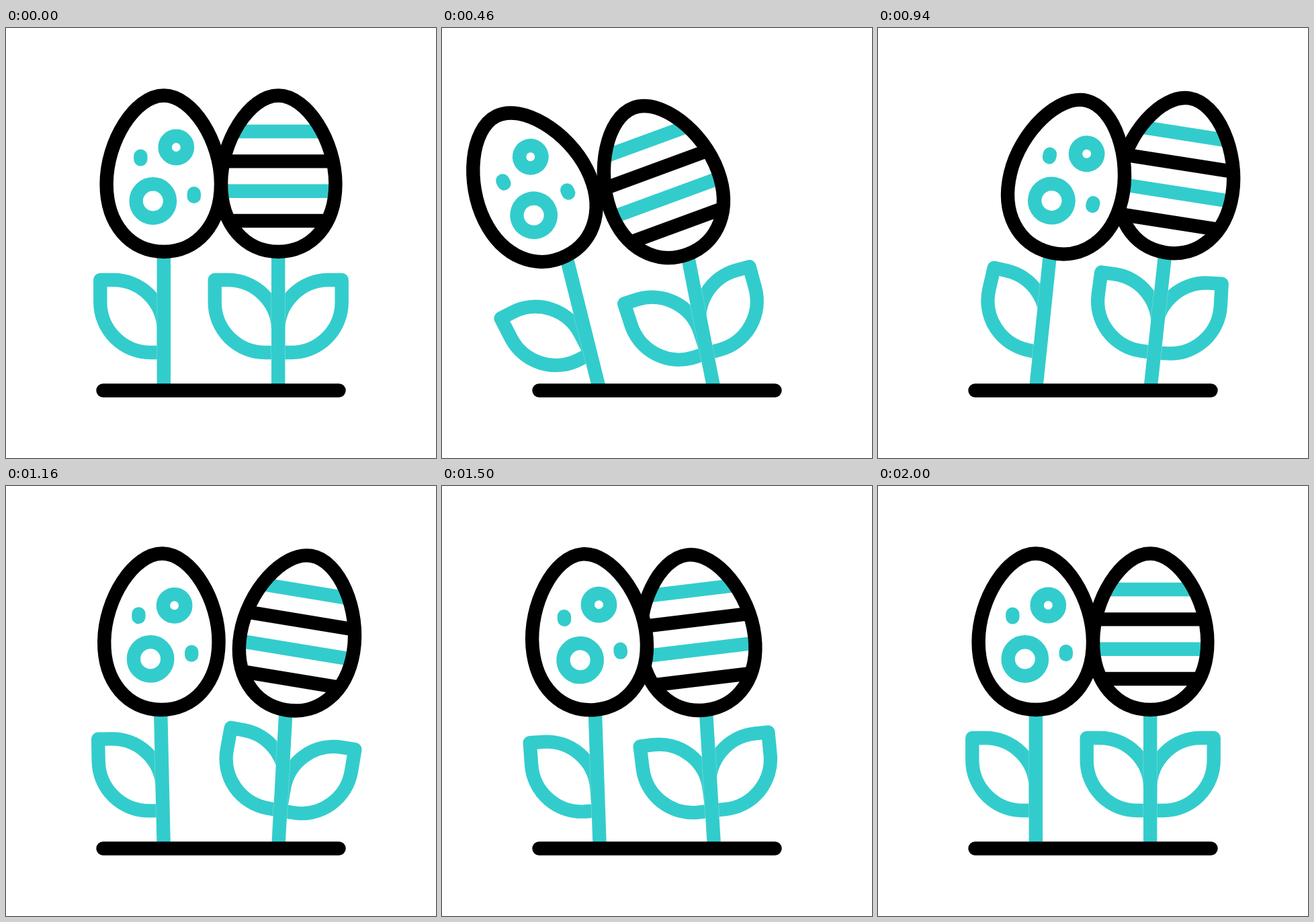
Recreate the animation shown at these times as an HTML page with a canvas. Size 640 by 640 pixels, loop 2.4 s.

```html
<!DOCTYPE html>
<html lang="en">
<head>
<meta charset="utf-8">
<title>Egg flowers</title>
<style>
html, body { margin: 0; width: 100%; height: 100%; overflow: hidden; background: #fff; }
canvas { display: block; width: 640px; height: 640px; }
</style>
</head>
<body>
<canvas id="stage"></canvas>
<script>
const LOOP = 2400, STEP = 20;
const TEAL = '#33cccc', BLACK = '#000', WHITE = '#fff';
const LINE = 20.4, GROUND = 539.5, EGG_BASE = 333, LEAF_BASE = 483;

const canvas = document.getElementById('stage');
const ratio = window.devicePixelRatio || 1;
canvas.width = canvas.height = 640 * ratio;
const ctx = canvas.getContext('2d');

// Swings as [time, degrees] keys, eased with a half cosine between them.
const spotted = {
  x: 234.8, delay: 0, pattern: spots,
  stem: [[0, 0], [480, -14.1], [880, 6.5], [1300, -3.9], [1700, 0]],
  egg: [[20, 0], [520, -27.5], [922, 13.6], [1335, -7.2], [1745, 0]],
  leaves: [
    { side: -1, keys: [[10, 0], [500, -27.8], [900, 13.4], [1315, -7.4], [1720, 0]] }
  ]
};
const striped = {
  x: 405.2, delay: 110, pattern: stripes,
  stem: [[0, 0], [480, -13.4], [880, 7], [1300, -3.9], [1700, 0]],
  egg: [[20, 0], [520, -27.2], [922, 14], [1335, -7.2], [1745, 0]],
  leaves: [
    { side: -1, keys: [[45, 0], [535, -26], [935, 14.2], [1350, -7.3], [1755, 0]] },
    { side: 1, keys: [[68, 0], [558, -24.3], [958, 11.5], [1373, -5.6], [1778, 0]] }
  ]
};

function swing(keys, t) {
  if (t <= keys[0][0]) return 0;
  for (let i = 1; i < keys.length; i++) {
    const [t0, a] = keys[i - 1], [t1, b] = keys[i];
    if (t < t1) return a + (b - a) * (1 - Math.cos(Math.PI * (t - t0) / (t1 - t0))) / 2;
  }
  return 0;
}

// Turns what is drawn about (0, y) by the given degrees.
function turned(y, deg, draw) {
  ctx.save();
  ctx.translate(0, y);
  ctx.rotate(deg * Math.PI / 180);
  ctx.translate(0, -y);
  draw();
  ctx.restore();
}

function line(x0, y0, x1, y1, color, cap = 'butt', width = LINE) {
  ctx.beginPath();
  ctx.moveTo(x0, y0);
  ctx.lineTo(x1, y1);
  ctx.lineCap = cap;
  ctx.lineWidth = width;
  ctx.strokeStyle = color;
  ctx.stroke();
}

function ring(x, y, r) {
  ctx.beginPath();
  ctx.arc(x, y, r, 0, Math.PI * 2);
  ctx.lineWidth = LINE;
  ctx.strokeStyle = TEAL;
  ctx.stroke();
}

function eggPath() {
  ctx.beginPath();
  ctx.moveTo(0, 100.5);
  ctx.bezierCurveTo(43, 100.5, 85.2, 169, 85.2, 232);
  ctx.bezierCurveTo(85.2, 293, 49, 333, 0, 333);
  ctx.bezierCurveTo(-49, 333, -85.2, 293, -85.2, 232);
  ctx.bezierCurveTo(-85.2, 169, -43, 100.5, 0, 100.5);
  ctx.closePath();
}

function egg(pattern) {
  eggPath();
  ctx.fillStyle = WHITE;
  ctx.fill();
  ctx.save();
  ctx.clip();
  pattern();
  ctx.restore();
  eggPath();
  ctx.lineWidth = LINE;
  ctx.strokeStyle = BLACK;
  ctx.stroke();
}

function spots() {
  ring(18.5, 177.5, 16.7);
  ring(-16, 257.5, 25.2);
  line(-34.5, 190.8, -34.5, 195.4, TEAL, 'round');
  line(45, 246.3, 45, 250.9, TEAL, 'round');
}

function stripes() {
  [154, 198.4, 242.7, 287].forEach((y, i) => line(-90, y, 90, y, i % 2 ? BLACK : TEAL));
}

function leaf(side, deg) {
  ctx.save();
  // keep the leaf on its own side of the stem
  ctx.beginPath();
  ctx.rect(0, 300, side * 200, 260);
  ctx.clip();
  turned(LEAF_BASE, deg, () => {
    ctx.scale(side, 1);
    ctx.beginPath();
    ctx.moveTo(0, 483);
    ctx.lineTo(19.5, 483);
    ctx.arc(19.5, 408, 75, Math.PI / 2, 0, true);
    ctx.lineTo(94.5, 375);
    ctx.lineTo(75, 375);
    ctx.arc(75, 450, 75, -Math.PI / 2, Math.PI, true);
    ctx.closePath();
    ctx.lineJoin = 'round';
    ctx.lineWidth = LINE;
    ctx.strokeStyle = TEAL;
    ctx.stroke();
  });
  ctx.restore();
}

function flower(f, time) {
  const t = time - f.delay;
  const bend = swing(f.stem, t);
  ctx.save();
  ctx.translate(f.x, 0);
  turned(GROUND, bend, () => {
    for (const { side, keys } of f.leaves) leaf(side, swing(keys, t) - bend);
    // hairline between leaf and stem
    line(0, EGG_BASE, 0, GROUND, 'rgba(255,255,255,.35)', 'butt', LINE + 1.2);
    line(0, EGG_BASE, 0, GROUND, TEAL);
    turned(EGG_BASE, swing(f.egg, t) - bend, () => egg(f.pattern));
  });
  ctx.restore();
}

function draw(t) {
  ctx.setTransform(ratio, 0, 0, ratio, 0, 0);
  ctx.fillStyle = WHITE;
  ctx.fillRect(0, 0, 640, 640);
  flower(striped, t);
  flower(spotted, t);
  line(144.5, GROUND, 495.5, GROUND, BLACK, 'round');
}

const start = performance.now();
function tick() {
  const t = (performance.now() - start) % LOOP;
  draw(Math.floor(t / STEP) * STEP);
  requestAnimationFrame(tick);
}
tick();
</script>
</body>
</html>
```
